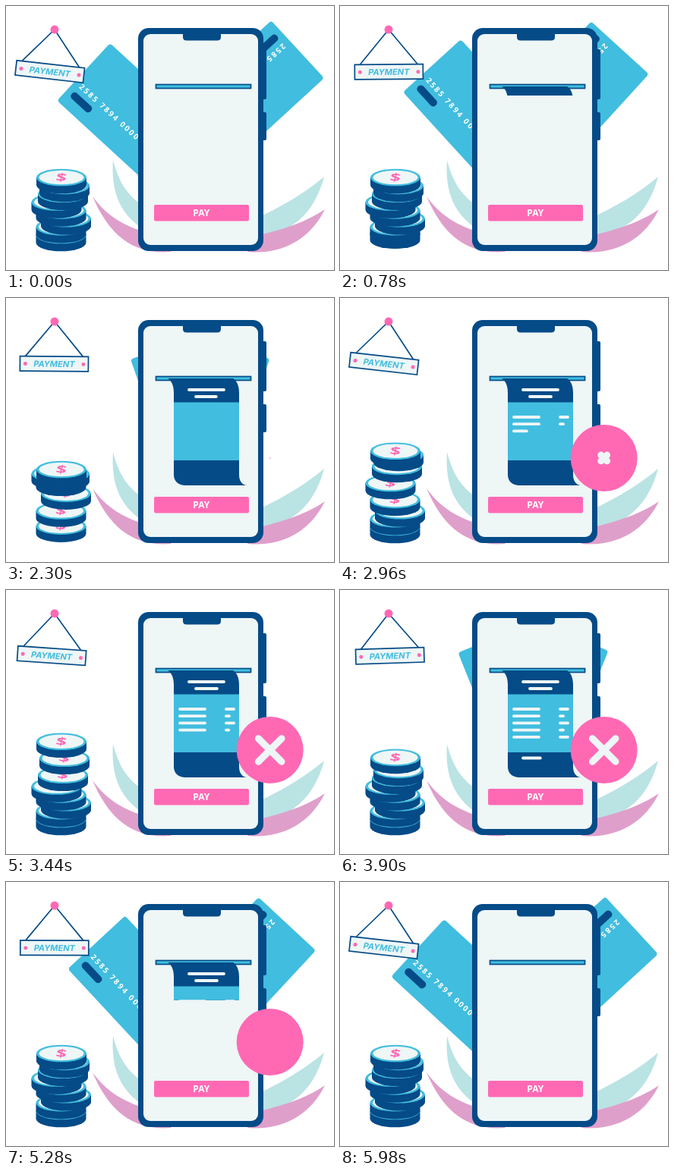
Recreate the animation shown at these times as an HTML page. Size 432 by 348 pixels, loop 6.02 s.

```html
<!DOCTYPE html>
<html lang="en">
<head>
<meta charset="utf-8">
<title>Payment</title>
<style>
  html, body { margin: 0; width: 100%; height: 100%; overflow: hidden; background: #fff; }
  svg { display: block; width: 432px; height: 348px; }
  text { font-family: "Open Sans", "Noto Sans", sans-serif; font-weight: 700; }
  .dark { fill: #054b87; }
  .cyan { fill: #41bddf; }
  .pink { fill: #ff69b4; }
  .pale { fill: #eef6f6; }
  .line { fill: none; stroke: #eef6f6; stroke-linecap: round; }
</style>
</head>
<body>
<svg viewBox="0 0 432 348">
  <defs>
    <g id="card">
      <rect class="cyan" width="165" height="103" rx="4"/>
      <rect class="dark" x="8" y="78" width="34" height="10" rx="4.5"/>
      <text x="9" y="71" font-size="10" letter-spacing="2.2" fill="#fff">2585 7894 0000</text>
    </g>
    <g id="coin">
      <path class="dark" d="M-33 0V10A33 11.3 0 0 0 33 10V0Z"/>
      <ellipse class="cyan" rx="33" ry="11.3"/>
      <ellipse class="pale" rx="29.5" ry="9.3"/>
      <text class="pink" font-size="19" text-anchor="middle" transform="scale(1.3 .75) rotate(8)" y="6.5">$</text>
    </g>
    <clipPath id="reveal"><rect id="mask" x="190" y="106" width="140" height="0"/></clipPath>
    <clipPath id="sheet">
      <path d="M206 104C216 104 221 113 221 125V233C221 242 228 247 236 247H317C310 246 307 240 307 233V125C307 113 302 104 292 104Z"/>
    </clipPath>
  </defs>

  <!-- leaves -->
  <g fill="#bae3e4">
    <path d="M141 203C149 233 159 251 190 270V300C150 278 138 246 141 203Z"/>
    <path d="M419 225C394 246 365 264 325 282V307C374 300 405 277 419 225Z"/>
  </g>
  <g fill="#df9fcb">
    <path d="M114 251C132 276 154 290 190 300L218 324C170 328 137 305 114 251Z"/>
    <path d="M420 268C395 285 365 295 325 304L318 324C362 328 400 309 420 268Z"/>
  </g>

  <g id="left"><use href="#card" transform="translate(137 49) rotate(42.6)"/></g>
  <g id="right"><use href="#card" transform="translate(419 95) rotate(137.4)"/></g>

  <!-- phone -->
  <g class="dark">
    <rect x="335" y="57" width="8" height="66" rx="2"/>
    <rect x="335" y="140" width="8" height="37" rx="2"/>
    <rect x="174" y="29" width="165" height="294" rx="14"/>
  </g>
  <rect class="pale" x="181" y="37" width="151" height="278" rx="9"/>
  <path class="dark" d="M233 36H283V41Q283 45.500 278 45.500H238Q233 45.500 233 41Z"/>
  <rect class="cyan" x="197.500" y="103.500" width="125" height="5" stroke="#054b87" stroke-width="1.700"/>

  <!-- receipt -->
  <g clip-path="url(#reveal)">
    <g clip-path="url(#sheet)">
      <rect class="dark" x="200" y="100" width="120" height="150"/>
      <rect class="cyan" x="200" y="137.500" width="120" height="76.500"/>
      <g id="rows" class="line" stroke-width="3.800"></g>
    </g>
  </g>

  <rect class="pink" x="195" y="262" width="125" height="21.500" rx="2"/>
  <text x="257.200" y="276.800" font-size="12" text-anchor="middle" fill="#fff">PAY</text>

  <!-- cancel badge -->
  <circle id="badge" class="pink" cx="347.700" cy="211"/>
  <path id="cross" class="line" stroke-width="9"/>

  <g id="coins"></g>

  <!-- hanging sign -->
  <g id="sign">
    <path d="M26 77L64 31L102 77" fill="none" stroke="#054b87" stroke-width="1.700"/>
    <rect class="pale" x="19" y="77" width="90" height="19.500" stroke="#054b87" stroke-width="1.700"/>
    <circle class="pink" cx="26" cy="87" r="2.500"/>
    <circle class="pink" cx="102.500" cy="87" r="2.500"/>
    <text class="cyan" x="64" y="90.900" font-size="11" text-anchor="middle" style="font-family:Inter,sans-serif;font-style:italic">PAYMENT</text>
    <circle class="pink" cx="64" cy="31" r="5.500"/>
  </g>
</svg>
<script>
const LOOP = 6020;
const $ = id => document.getElementById(id);
const clamp = v => Math.max(0, Math.min(1, v));
const progress = (t, from, to) => clamp((t - from) / (to - from));
const ease = p => p < .5 ? 2 * p * p : 1 - 2 * (1 - p) ** 2;
const pulse = (t, a, b, c, d) => ease(progress(t, a, b)) - ease(progress(t, c, d));

function add(parent, tag, attrs) {
  const el = document.createElementNS("http://www.w3.org/2000/svg", tag);
  for (const k in attrs) el.setAttribute(k, attrs[k]);
  return parent.appendChild(el);
}

// Receipt lines in writing order: x1, x2, y
const lines = [[241, 287, 121], [250, 278, 130]];
for (let i = 0; i < 5; i++) {
  const y = 157 + i * 9.2;
  lines.push([229, 262, y], [290, i % 2 ? 294 : 300, y]);
}
lines.push([241, 264, 221.5]);
const rows = lines.map(() => add($("rows"), "path", {}));

// Coins from the bottom up
const coinX = [72.5, 72.5, 79, 72.5, 66.5, 75, 77, 73];
const coins = coinX.map(() => add($("coins"), "use", { href: "#coin" }));

function draw(t) {
  const phase = 2 * Math.PI * t / LOOP;

  const turn = 16 * (1 - Math.cos(phase));
  $("left").setAttribute("transform", `rotate(${turn} 204.5 298)`);
  $("right").setAttribute("transform", `rotate(${-turn} 353 232)`);
  $("sign").setAttribute("transform", `rotate(${6.4 * Math.cos(2 * phase)} 64 31)`);

  // A hop travels up the stack
  coins.forEach((coin, i) => {
    const hop = progress(t, 580 + i * 246, 2430 + i * 246);
    const y = 302 - i * 10.86 - 30 * Math.sin(Math.PI * hop) ** 2;
    coin.setAttribute("transform", `translate(${coinX[i]} ${y})`);
  });

  const out = pulse(t, 620, 1520, 4880, 5560);
  $("mask").setAttribute("height", out && 3 + 139 * out);
  rows.forEach((row, i) => {
    const [x1, x2, y] = lines[i];
    const p = clamp((t - 2017) / 145 - i);
    row.setAttribute("d", p ? `M${x1} ${y}H${x1 + (x2 - x1) * p}` : "");
  });

  $("badge").setAttribute("r", 44 * pulse(t, 2250, 2800, 5380, 6010));
  const arm = 15.3 * pulse(t, 2800, 3250, 4750, 5200);
  $("cross").setAttribute("d", arm > 0
    ? `M${347.7 - arm} ${211 - arm}l${2 * arm} ${2 * arm}m0 ${-2 * arm}l${-2 * arm} ${2 * arm}` : "");
}

const start = performance.now();
function tick() {
  draw((performance.now() - start) % LOOP);
  requestAnimationFrame(tick);
}
tick();
</script>
</body>
</html>
```
